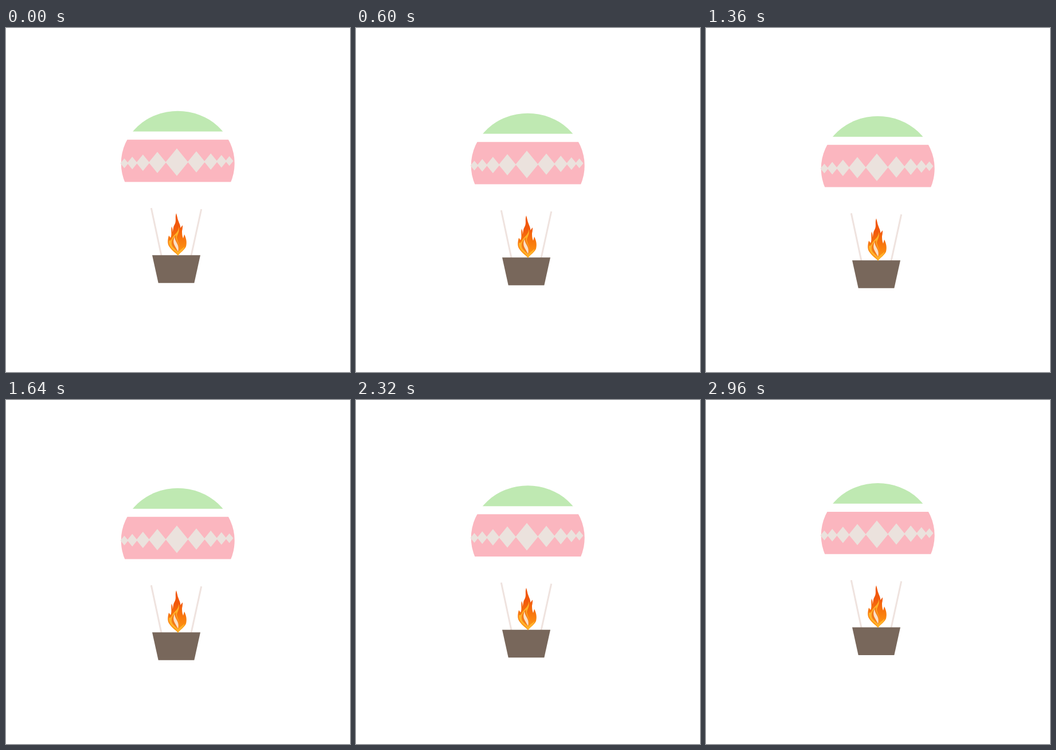
Recreate the animation shown at these times as an HTML page. Size 600 px wide and 600 px high, loop 3000 ms.

```html
<!DOCTYPE html>
<html lang="en">
<head>
<meta charset="utf-8">
<title>Hot-air balloon</title>
<style>
  html, body { margin: 0; width: 100%; height: 100%; overflow: hidden; background: #fff; }
  svg { display: block; width: 600px; height: 600px; }
</style>
</head>
<body>
<svg viewBox="0 0 600 600">
  <defs>
    <clipPath id="envelope"><ellipse cx="299.7" cy="236" rx="99" ry="91.3"/></clipPath>
    <linearGradient id="heat" x2="0" y2="1">
      <stop offset=".3" stop-color="#f2580b"/>
      <stop offset="1" stop-color="#ff9d12"/>
    </linearGradient>
  </defs>
  <g id="balloon">
    <g clip-path="url(#envelope)">
      <path fill="#bfe9b2" d="M200 140H400V180.6H200Z"/>
      <path fill="#fbb6bf" d="M200 194.7H400V268.4H200Z"/>
    </g>
    <path id="diamonds" fill="#ebe2dd"/>
    <path stroke="#efe3df" stroke-width="3" d="M253.3 314L271 397M340.7 316L323 397"/>
    <path fill="#78675b" d="M255 396.3H339L328.3 444.8H265.7Z"/>
    <path fill="url(#heat)" d="M297 323C294 331 298 336 294 343C291 348 292 352 290.5 356C291 352 290 349 289 346C287 354 290 360 287 366L284 362C281 373 282 378 286 383C290 389 296 392 300 397C304 391 311 388 314 381C316 373 314 366 311 360L309 367C307 362 307 358 307 354C308 350 308 347 308 344C306 346 305 348 304.5 349C304 342 300 337 299 331Z"/>
    <path fill="#ffb32a" d="M301 346C302 357 292 360 289 368C286 373 285 369 284 371C283 378 288 384 293 388C297 391 299 393 300 397C303 391 309 389 312 381C307 385 303 387 301 390C305 381 299 373 298 366C298 360 304 356 301 346Z"/>
    <path fill="#f47a18" d="M297 361C290 367 287 373 290 380C293 385 297 387 300 391C304 383 301 378 299 373C297 369 296 365 297 361Z"/>
    <path fill="#fbe0c6" d="M294 364C291 371 292 376 295 381L300 390C302 383 300 379 298 375C296 371 294 368 294 364Z"/>
  </g>
</svg>
<script>
const LOOP = 3000, STEP = 40, RISE = 10;
const balloon = document.getElementById('balloon');

// Diamonds shrink and close up geometrically on both sides of the middle one.
function diamond(i) {
  const n = Math.abs(i);
  const x = 298 + Math.sign(i) * 34 * (1 - .74 ** n) / (1 - .74);
  const y = 234 - i / 2;
  const h = 24 * .77 ** n, w = .82 * h;
  return `M${x - w} ${y}l${w} ${-h} ${w} ${h} ${-w} ${h}z`;
}

let row = '';
for (let i = -4; i <= 4; i++) row += diamond(i);
document.getElementById('diamonds').setAttribute('d', row);

// Sinks and climbs back at constant speed, in steps.
function tick() {
  const t = Math.floor(performance.now() % LOOP / STEP) * STEP;
  const y = RISE * (1 - Math.abs(1 - 2 * t / LOOP));
  balloon.setAttribute('transform', `translate(0 ${y})`);
  requestAnimationFrame(tick);
}
tick();
</script>
</body>
</html>
```
